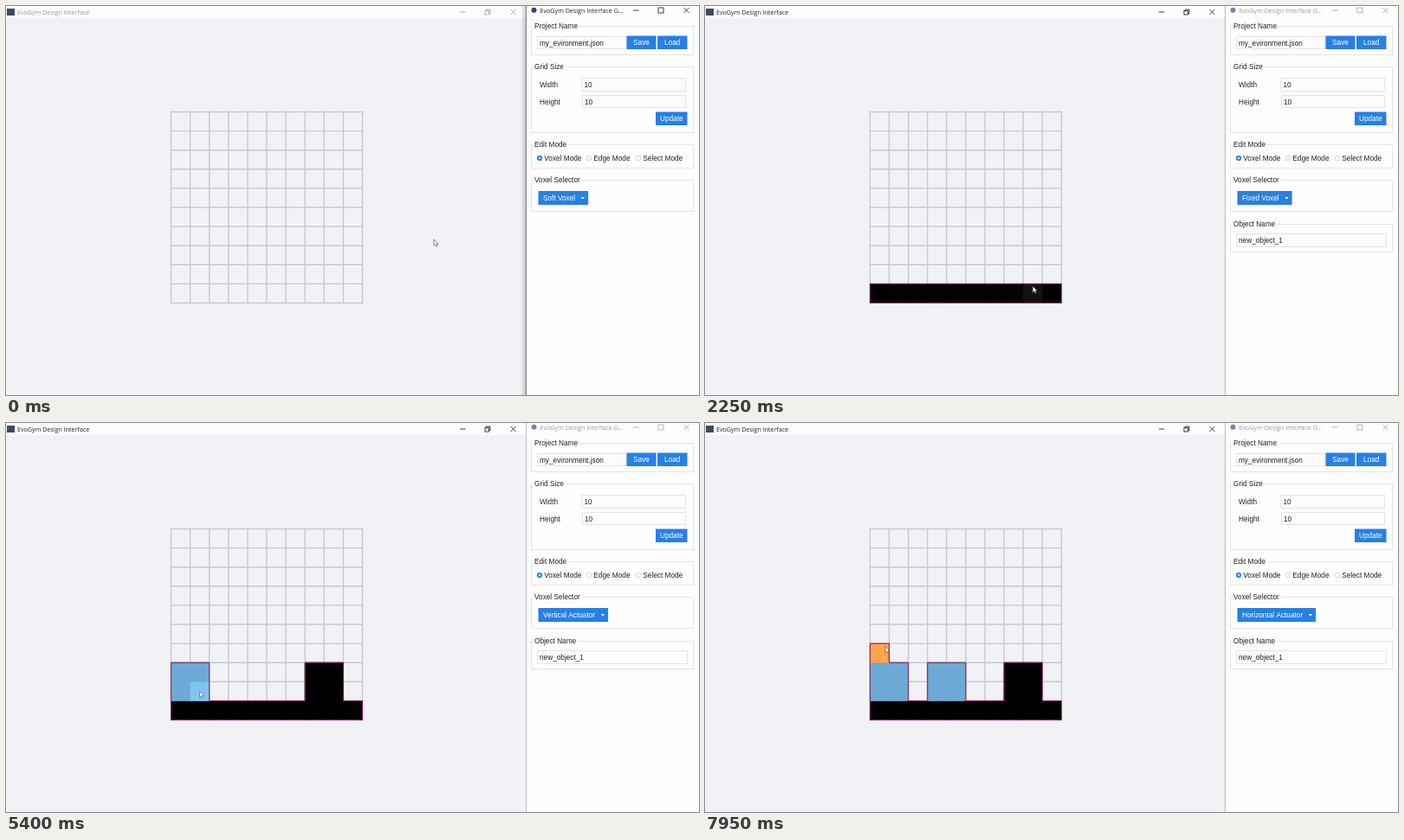
An HTML page with a canvas that plays this animation: 800x450 px, repeating every 8 s.

```html
<!DOCTYPE html>
<html>
<head>
<meta charset="utf-8">
<style>
html, body { margin: 0; width: 100%; height: 100%; overflow: hidden; background: #fff; }
canvas { display: block; }
</style>
</head>
<body>
<canvas id="stage" width="800" height="450"></canvas>
<script>
const ctx = document.getElementById('stage').getContext('2d');
const LOOP = 8000, STEP = 50;
const GRID = { x: 190.5, y: 122.5, size: 22.1, n: 10 };
const UI = '8.25px "Liberation Sans", Arial, sans-serif';
const TITLE = '7.15px "Open Sans", sans-serif';
const BLUE = '#2780e3', DARK_BLUE = '#1864b5', EDGE = '#e2e4e7', PURPLE = '#84206a';

const ITEMS = ['Empty Voxel', 'Rigid Voxel', 'Soft Voxel',
  'Horizontal Actuator', 'Vertical Actuator', 'Fixed Voxel'];
const [SOFT, HORIZONTAL, VERTICAL, FIXED] = [2, 3, 4, 5];
const FILL = {
  [HORIZONTAL]: ['#fd8e3e', '#ffa54c'],
  [VERTICAL]: ['#6caad5', '#80c5f2'],
  [FIXED]: ['#000', '#121212']
};

// The session is scripted as gestures; they fill these three lists.
const path = [], menus = [], strokes = [];
const itemY = i => 237 + i * 11.65;
const cellCentre = ([c, r]) => [GRID.x + (c + .5) * GRID.size, GRID.y + (r + .5) * GRID.size];

function moveTo(time, [x, y], linear = false) {
  path.push({ time, x, y, linear });
}

// Open the dropdown, hover `via`, then choose `item`.
function pick(arrive, open, reach, close, item, via = item) {
  const button = [626, 221];
  moveTo(arrive, button);
  moveTo(open + 80, button);
  moveTo(reach, [640, itemY(via)]);
  moveTo(close - 150, [640, itemY(via)]);
  moveTo(close, [640, itemY(item)]);
  menus.push({ start: open, end: close, item });
}

// Drag through the cells at an even speed.
function paint(start, end, item, ...cells) {
  const points = cells.map(cellCentre);
  let total = 0;
  const travelled = points.map(([x, y], i) =>
    total += i ? Math.hypot(x - points[i - 1][0], y - points[i - 1][1]) : 0);
  points.forEach((p, i) => moveTo(start + (end - start) * travelled[i] / total, p, i > 0));
  strokes.push({ start, end, item });
}

const square = c => [[c, 8], [c, 7], [c + 1, 7], [c + 1, 8]];

moveTo(50, [494, 270]);
pick(300, 600, 900, 1050, FIXED);
moveTo(1400, cellCentre([0, 9]));
paint(1450, 2530, FIXED, [0, 9], [9, 9], [8, 9], [8, 7], [7, 7], [7, 8]);
moveTo(2750, cellCentre([7, 8]));
pick(3400, 3450, 3900, 4400, VERTICAL, SOFT);
paint(5050, 5400, VERTICAL, ...square(0));
paint(5650, 5950, VERTICAL, ...square(3));
pick(6900, 7000, 7250, 7400, HORIZONTAL);
paint(7700, 7950, HORIZONTAL, [0, 6], [.3, 5.65]);

function cursorAt(t) {
  const i = path.findIndex(k => k.time > t);
  if (i <= 0) {
    const k = i ? path[path.length - 1] : path[0];
    return [k.x, k.y];
  }
  const a = path[i - 1], b = path[i];
  const u = (t - a.time) / (b.time - a.time), e = b.linear ? u : u * u * (3 - 2 * u);
  return [a.x + (b.x - a.x) * e, a.y + (b.y - a.y) * e];
}

function cellAt([x, y]) {
  const c = Math.floor((x - GRID.x) / GRID.size), r = Math.floor((y - GRID.y) / GRID.size);
  return c >= 0 && r >= 0 && c < GRID.n && r < GRID.n ? c + ',' + r : null;
}

function paintedCells(t) {
  const cells = new Map();
  for (const { start, end, item } of strokes)
    for (let s = start; s <= Math.min(t, end); s += 10) {
      const key = cellAt(cursorAt(s));
      if (key && !cells.has(key)) cells.set(key, item);
    }
  return cells;
}

function rect(x0, y0, x1, y1, fill, stroke) {
  if (fill) { ctx.fillStyle = fill; ctx.fillRect(x0, y0, x1 - x0, y1 - y0); }
  if (stroke) {
    ctx.strokeStyle = stroke;
    ctx.lineWidth = 1;
    ctx.strokeRect(x0 + .5, y0 + .5, x1 - x0 - 1, y1 - y0 - 1);
  }
}

function trace(points) {
  ctx.beginPath();
  points.forEach(([x, y]) => ctx.lineTo(x, y));
}

function line(color, width, ...points) {
  ctx.strokeStyle = color;
  ctx.lineWidth = width;
  trace(points);
  ctx.stroke();
}

function shape(fill, ...points) {
  ctx.fillStyle = fill;
  trace(points);
  ctx.fill();
}

function disc(x, y, r, fill, stroke) {
  ctx.beginPath();
  ctx.arc(x, y, r, 0, 7);
  ctx.fillStyle = fill;
  ctx.fill();
  if (stroke) { ctx.strokeStyle = stroke; ctx.lineWidth = .8; ctx.stroke(); }
}

// y is the vertical centre of the capitals
function text(str, x, y, color = '#222', font = UI) {
  ctx.font = font;
  ctx.fillStyle = color;
  ctx.fillText(str, x, y + 3);
}

function group(label, y0, y1) {
  rect(606, y0, 794, y1, null, EDGE);
  ctx.font = UI;
  rect(608, y0 - 3, 612 + ctx.measureText(label).width, y0 + 4, '#fefefe');
  text(label, 610, y0 + .3);
}

function entry(str, x0, y0, x1, y1) {
  rect(x0, y0, x1, y1, '#fcfcfd', EDGE);
  text(str, x0 + 3, (y0 + y1) / 2 + .2);
}

function button(label, x0, y0, x1, y1) {
  rect(x0, y0, x1, y1, BLUE);
  ctx.textAlign = 'center';
  text(label, (x0 + x1) / 2, (y0 + y1) / 2, '#fff');
  ctx.textAlign = 'left';
}

function titleBar(label, x, y, active, maximized) {
  const ink = active ? '#111' : '#a0a0a0';
  text(label, x, y - .3, active ? '#222' : '#999', TITLE);
  const bx = maximized ? 527 : 727, cx = bx + 29, dx = bx + 58.5;
  line(ink, .8, [bx - 3, y], [bx + 3.5, y]);
  if (maximized) {
    ctx.strokeRect(cx - 3, y - 1.5, 4.5, 4.5);
    line(ink, .8, [cx - 1.5, y - 1.5], [cx - 1.5, y - 3], [cx + 3, y - 3], [cx + 3, y + 1.5], [cx + 1.5, y + 1.5]);
  } else ctx.strokeRect(cx - 3, y - 3, 6, 6);
  line(ink, .8, [dx - 3, y - 3], [dx + 3, y + 3]);
  line(ink, .8, [dx - 3, y + 3], [dx + 3, y - 3]);
}

function drawGrid(cells, hover) {
  const { x, y, size, n } = GRID;
  const place = key => {
    const [c, r] = key.split(',').map(Number);
    return { c, r, px: x + c * size, py: y + r * size };
  };
  const fillCell = (key, color, grow = 0) => {
    const { px, py } = place(key);
    rect(px - grow, py - grow, px + size + grow, py + size + grow, color);
  };

  if (hover) fillCell(hover, '#dbdcde');
  for (let i = 0; i <= n; i++) {
    const d = i * size, end = n * size + .7;
    line('#c9c9ca', 1.4, [x + d, y - .7], [x + d, y + end]);
    line('#c9c9ca', 1.4, [x - .7, y + d], [x + end, y + d]);
  }
  for (const [key, item] of cells) fillCell(key, FILL[item][0], .4);
  if (cells.has(hover)) fillCell(hover, FILL[cells.get(hover)][1]);

  for (const key of cells.keys()) {
    const { c, r, px, py } = place(key), qx = px + size, qy = py + size;
    const side = (dc, dr, a, b) => {
      if (!cells.has((c + dc) + ',' + (r + dr))) line(PURPLE, 1.1, a, b);
    };
    side(0, -1, [px, py], [qx, py]);
    side(0, 1, [px, qy], [qx, qy]);
    side(-1, 0, [px, py], [px, qy]);
    side(1, 0, [qx, py], [qx, qy]);
  }
}

function drawPanel(t, hasObject, selected, menu, [mx, my]) {
  group('Project Name', 23, 57);
  entry('my_evironment.json', 613, 35, 716, 50);
  button('Save', 716.5, 34.5, 750.5, 50);
  button('Load', 752, 34.5, 786.5, 50);

  group('Grid Size', 70, 147);
  text('Width', 616, 91);
  entry('10', 664.5, 83, 785, 99);
  text('Height', 616, 111);
  entry('10', 665, 103, 785, 118);
  button('Update', 750, 122.5, 786.5, 138);

  group('Edit Mode', 160, 188);
  ['Voxel Mode', 'Edge Mode', 'Select Mode'].forEach((label, i) => {
    const x = 616 + i * 57;
    disc(x, 176, 2.8, i ? '#fff' : BLUE, i ? '#ccc' : BLUE);
    if (!i) disc(x, 176, 1.2, '#fff');
    text(label, x + 5.3, 176.2);
  });

  group('Voxel Selector', 201, 238);
  ctx.font = UI;
  const right = 635 + ctx.measureText(ITEMS[selected]).width;
  const over = mx > 615 && mx < right && my > 214 && my < 230;
  rect(614.5, 214, right, 230, menu || over ? DARK_BLUE : BLUE);
  text(ITEMS[selected], 620, 222, '#fff');
  shape('#fff', [right - 8.5, 221], [right - 4, 221], [right - 6.2, 223.4]);

  if (hasObject) {
    group('Object Name', 252, 285);
    entry('new_object_1', 613, 263, 787, 279);
  }
  if (menu) drawMenu(t - menu.start, selected, mx, my);
}

// The menu fades in shortly after it opens.
function drawMenu(age, selected, mx, my) {
  ctx.globalAlpha = Math.min(1, .6 + age / 250);
  rect(708.5, 232, 710, 303.5, '#b5b5b5');
  rect(617, 302, 710, 303.5, '#b5b5b5');
  rect(615, 230, 709, 302.5, '#fefefe', '#a0a0a0');
  ITEMS.forEach((label, i) => {
    const y = itemY(i);
    const over = mx > 615 && mx < 709 && Math.abs(my - y) < 5.8;
    if (over) rect(617, y - 5.8, 707, y + 5.8, '#7e8081');
    text(label, 628.3, y, over ? '#fff' : '#333');
    if (i === selected) line(BLUE, 1.2, [620.5, y], [622, y + 1.6], [624.8, y - 1.6]);
  });
  ctx.globalAlpha = 1;
}

function drawCursor([x, y]) {
  const arrow = [[0, 0], [0, 7.2], [1.7, 5.7], [2.8, 8.2], [4, 7.7], [2.9, 5.2], [5, 5.1], [0, 0]]
    .map(([dx, dy]) => [x + dx, y + dy]);
  shape('#fff', ...arrow);
  line('#444', .6, ...arrow);
}

function draw(t) {
  const pos = cursorAt(t), cells = paintedCells(t);
  const lastStart = list => Math.max(-1, ...list.map(e => e.start).filter(s => s <= t));
  const leftActive = lastStart(strokes) > lastStart(menus);
  const menu = menus.find(m => t >= m.start && t < m.end);
  const selected = menus.reduce((item, m) => t >= m.end ? m.item : item, SOFT);

  rect(0, 0, 800, 450, '#f1f2f6');
  rect(0, 0, 600, 14, '#fdfdfd');
  rect(1, 3, 10, 11, '#3c4b5c');
  titleBar('EvoGym Design Interface', 13, 7, leftActive, true);
  drawGrid(cells, cellAt(pos));

  if (!leftActive) {
    const shade = ctx.createLinearGradient(594, 0, 600, 0);
    shade.addColorStop(0, 'rgba(0,0,0,0)');
    shade.addColorStop(1, 'rgba(0,0,0,.2)');
    rect(594, 0, 600, 450, shade);
  }
  rect(600, 0, 800, 450, '#fefefe');
  rect(600, 0, 601, 450, leftActive ? '#bcbcbe' : '#808184');
  disc(609.5, 4.8, 3, leftActive ? '#6d87a5' : '#254a78');
  titleBar('EvoGym Design Interface G...', 616.5, 5, !leftActive, false);
  drawPanel(t, cells.size > 0, selected, menu, pos);
  drawCursor(pos);
}

function tick() {
  draw(Math.floor(performance.now() % LOOP / STEP) * STEP);
  requestAnimationFrame(tick);
}
tick();
</script>
</body>
</html>
```
